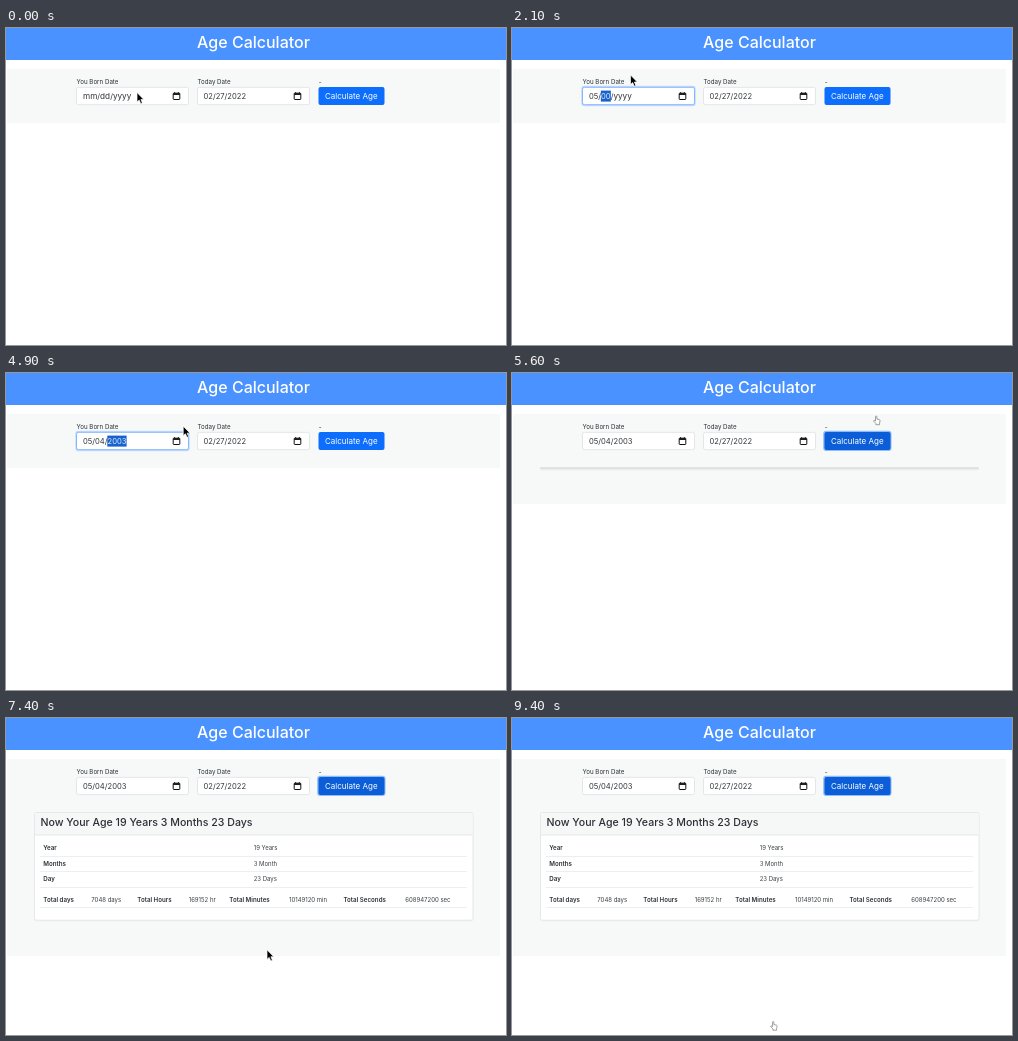
Recreate the animation shown at these times as an HTML page. Size 500 px wide and 317 px high, loop 9.7 s.

```html
<!DOCTYPE html>
<html lang="en">
<head>
<meta charset="utf-8">
<title>Age Calculator</title>
<style>
  html, body { margin: 0; width: 100%; height: 100%; overflow: hidden; background: #fff; }
  svg { display: block; width: 100vw; height: 100vh; font-family: Inter, "Open Sans", sans-serif; }
  text { fill: #2b3035; white-space: pre; }
  .label { font-size: 6.2px; }
  .cell { font-size: 6px; fill: #3c4145; }
  .head { font-size: 6.2px; font-weight: 600; }
  .rule { stroke: #eceeef; stroke-width: 1; }
  .input { fill: #fff; stroke: #e3e6e8; }
</style>
</head>
<body>
<svg id="stage" viewBox="0 0 500 317">
  <defs>
    <g id="calendar" fill="none" stroke="#111">
      <rect x=".6" y="1.3" width="6.6" height="6.3" rx=".6"/>
      <path d="M.6 2.2H7.2" stroke-width="1.7"/>
      <path d="M2 .2V1.6M5.8 .2V1.6" stroke-width=".9"/>
    </g>
  </defs>
  <rect width="500" height="317" fill="#fff"/>
  <rect width="500" height="32" fill="#4a92ff"/>
  <text x="247.5" y="19.8" text-anchor="middle" style="font-size:16px;font-weight:500;fill:#fff">Age Calculator</text>
  <rect id="panel" x="1" y="41" width="493" height="54" fill="#f6f9f8"/>

  <text class="label" x="70.5" y="56.4">You Born Date</text>
  <text class="label" x="191.5" y="56.4">Today Date</text>
  <text class="label" x="312.7" y="56.2">-</text>

  <rect id="inputRing" x="69.3" y="57.8" width="114.4" height="20.4" rx="3" fill="#c2dbfe"/>
  <rect id="born" class="input" x="70.5" y="59.3" width="112" height="17.4" rx="2"/>
  <rect class="input" x="191.5" y="59.3" width="112" height="17.4" rx="2"/>
  <rect id="selection" y="62.6" height="11" fill="#1762cf"/>
  <g id="bornText"></g>
  <g id="todayText"></g>
  <use href="#calendar" x="166.6" y="63.9"/>
  <use href="#calendar" x="287.6" y="63.9"/>

  <rect id="buttonRing" x="311.2" y="57.7" width="68.3" height="20.3" rx="3" fill="#8dbbfb"/>
  <rect id="button" x="312.5" y="59" width="66" height="18" rx="2"/>
  <text x="345.3" y="70.8" text-anchor="middle" style="font-size:8px;fill:#fff">Calculate Age</text>

  <g id="emptyCard">
    <rect x="28" y="95.6" width="439" height="2" rx="1" fill="#edf0ef"/>
    <rect x="28" y="94.3" width="439" height="1.7" rx=".8" fill="#dcdfde"/>
  </g>
  <g id="card">
    <rect x="28" y="95.6" width="439.4" height="107.9" rx="2.5" fill="#eff2f1"/>
    <rect x="28.5" y="94.5" width="438.5" height="107.7" rx="2" fill="#fff" stroke="#e5e8e8"/>
    <path d="M29 117V96.5Q29 95 30.5 95H465Q466.5 95 466.5 96.5V117Z" fill="#f6f7f7"/>
    <path d="M29 117H466.5" stroke="#e5e8e8"/>
    <text x="34.5" y="107.8" style="font-size:10.6px;font-weight:500">Now Your Age 19 Years 3 Months 23 Days</text>
    <g id="rows"></g>
  </g>

  <path id="arrow" d="M0 0V9.6L2.2 7.6L3.8 11.2L5.4 10.5L3.9 7H6.8Z" fill="#000" stroke="#fff" stroke-width=".7" stroke-linejoin="round"/>
  <path id="hand" d="M1.5 5V.9Q1.5 0 2.2 0T2.9 .9V3.1L5.3 3.6Q6.2 3.9 6.1 4.8L5.6 7V8.7H1.9V7.4L-.3 5.2Q-.5 4.5 .2 4.3Z" fill="#fff" stroke="#777" stroke-width=".7" stroke-linejoin="round"/>
</svg>
<script>
const LOOP = 9700, STEP = 100;
const CLICK = 5300, EMPTY = 5400, RESULT = 5900;
const NS = "http://www.w3.org/2000/svg";
const $ = id => document.getElementById(id);

function add(parent, tag, attrs, text = "") {
  const el = document.createElementNS(NS, tag);
  for (const key in attrs) el.setAttribute(key, attrs[key]);
  el.textContent = text;
  parent.appendChild(el);
  return el;
}

const show = (id, on) => $(id).setAttribute("visibility", on ? "visible" : "hidden");

// start time, date text, selected part (-1: none)
const dates = [
  [0, "mm/dd/yyyy", -1],
  [500, "mm/dd/yyyy", 0],
  [1600, "00/dd/yyyy", 0],
  [1700, "05/dd/yyyy", 1],
  [2100, "05/00/yyyy", 1],
  [2500, "05/04/yyyy", 2],
  [3000, "05/04/0002", 2],
  [3400, "05/04/0020", 2],
  [3600, "05/04/0200", 2],
  [3900, "05/04/2003", 2],
  [CLICK, "05/04/2003", -1]
];

// time, x, y of the pointer tip
const path = [
  [0, 131, 64.5], [400, 89, 67], [600, 89, 67], [1000, 118.5, 47],
  [3000, 118.5, 47], [3100, 121.3, 48.5], [4800, 121.3, 48.5],
  [5200, 345, 67], [5400, 347, 67], [5600, 362, 43], [6000, 362, 43],
  [6400, 229, 108.5], [7000, 250, 173], [7400, 261, 231.8],
  [7800, 262, 295], [8200, 260, 299], [8400, 259.5, 300],
  [8800, 259, 302], [9300, 259, 303.5], [LOOP, 259, 303.5]
];

function pointerAt(t) {
  const i = Math.max(1, path.findIndex(p => p[0] >= t));
  const [t0, x0, y0] = path[i - 1], [t1, x1, y1] = path[i];
  const k = (t - t0) / (t1 - t0);
  return [x0 + (x1 - x0) * k, y0 + (y1 - y0) * k];
}

function drawDate(group, value, x, selected = -1) {
  group.replaceChildren();
  let mark = null;
  value.split(/(\/)/).forEach((part, i) => {
    const on = selected >= 0 && i === selected * 2;
    const size = /[a-z]/.test(part) ? 8.2 : 7.6;
    const el = add(group, "text", { x, y: 70.7, style: `font-size:${size}px;fill:${on ? "#e4efff" : "#30353a"}` }, part);
    const width = el.getComputedTextLength();
    if (on) mark = [x, width];
    x += width;
  });
  return mark;
}

function buildRows() {
  const rows = $("rows");
  [["Year", "19 Years"], ["Months", "3 Month"], ["Day", "23 Days"]].forEach(([name, value], i) => {
    const y = 132.2 + i * 15.3;
    add(rows, "text", { class: "head", x: 37.3, y }, name);
    add(rows, "text", { class: "cell", x: 247.7, y }, value);
    add(rows, "path", { class: "rule", d: `M34 ${Math.round(y + 5.8) + .5}H461` });
  });
  [[37.3, "Total days", 85.3, "7048 days"], [131.3, "Total Hours", 182.7, "169152 hr"],
   [223.3, "Total Minutes", 283, "10149120 min"], [337.5, "Total Seconds", 399.3, "608947200 sec"]]
    .forEach(([x, name, valueX, value]) => {
      add(rows, "text", { class: "head", x, y: 184 }, name);
      add(rows, "text", { class: "cell", x: valueX, y: 184 }, value);
    });
  add(rows, "path", { class: "rule", d: "M34 189.5H461" });
}

let lastDate = null;

function draw(time) {
  const t = Math.floor((time % LOOP) / STEP) * STEP;
  const date = dates.filter(d => d[0] <= t).pop();
  if (date !== lastDate) {
    const mark = drawDate($("bornText"), date[1], 77, date[2]);
    show("selection", mark);
    if (mark) {
      $("selection").setAttribute("x", mark[0] - .2);
      $("selection").setAttribute("width", mark[1] + .4);
    }
    lastDate = date;
  }

  const focused = t >= 500 && t < CLICK, clicked = t >= CLICK;
  show("inputRing", focused);
  $("born").style.stroke = focused ? "#86b7fe" : "";
  show("buttonRing", clicked);

  const [x, y] = pointerAt(t);
  const hover = x > 312 && x < 379 && y > 59 && y < 77;
  $("button").setAttribute("fill", clicked || hover ? "#0b5ed7" : "#0d6efd");
  show("emptyCard", t >= EMPTY && t < RESULT);
  show("card", t >= RESULT);
  $("panel").setAttribute("height", t >= RESULT ? 197 : t >= EMPTY ? 90 : 54);

  const hand = hover || (clicked && t < 6100) || t >= 7800;
  show("hand", hand);
  show("arrow", !hand);
  $(hand ? "hand" : "arrow").setAttribute("transform", `translate(${x} ${y})`);
}

buildRows();
drawDate($("todayText"), "02/27/2022", 197.5);
const start = performance.now();
function tick() {
  draw(performance.now() - start);
  requestAnimationFrame(tick);
}
tick();
</script>
</body>
</html>
```
